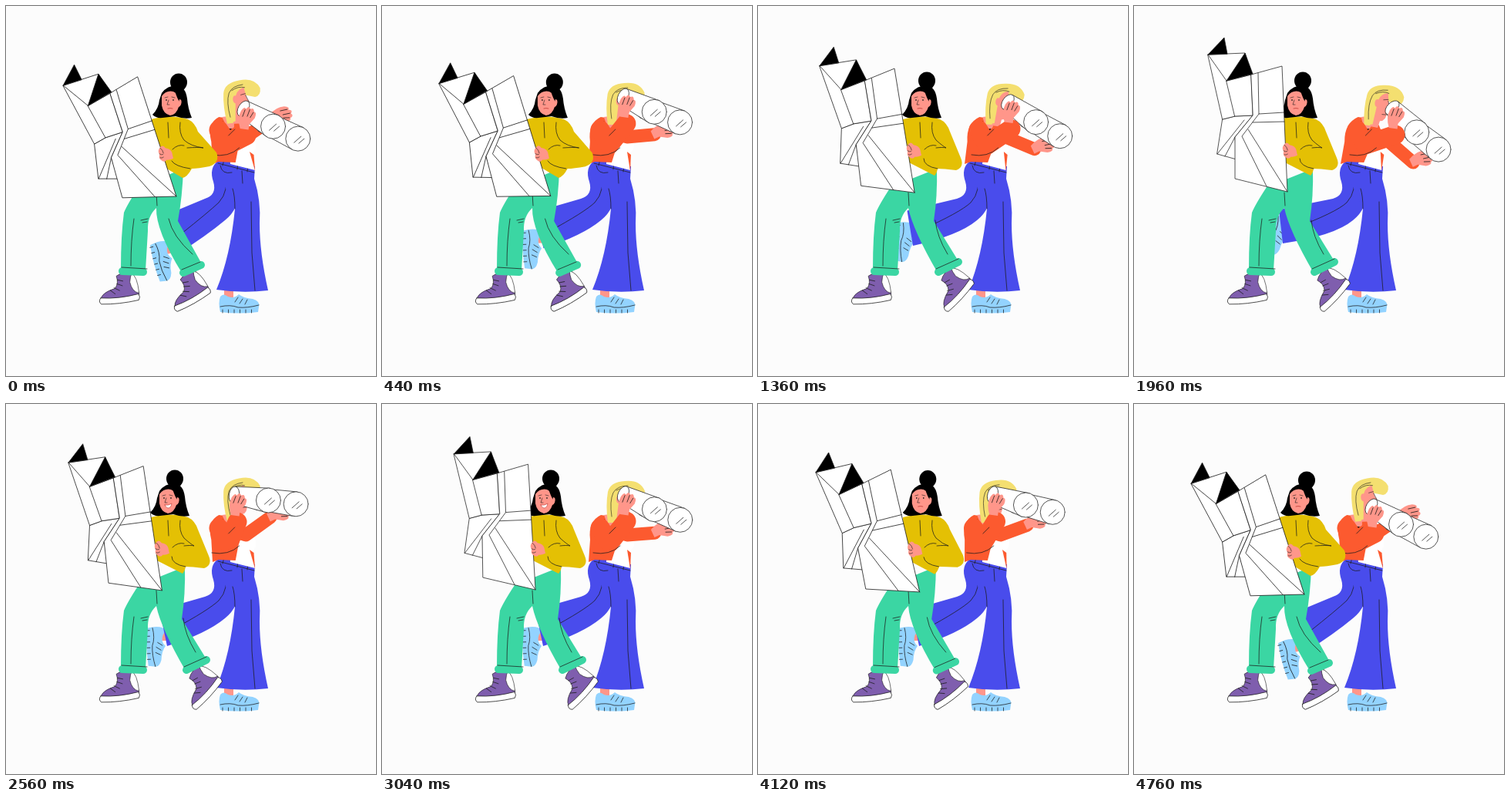
An HTML page with a canvas for the animation above (4800 ms loop, 480x480 px).

```html
<!DOCTYPE html>
<html lang="en">
<head>
<meta charset="utf-8">
<title>Finding the way</title>
<style>
html, body { margin: 0; width: 100%; height: 100%; overflow: hidden; background: #fcfcfc; }
canvas { display: block; width: 480px; height: 480px; }
</style>
</head>
<body>
<canvas id="stage"></canvas>
<script>
const LOOP = 4800, STEP = 40;
const C = {
  paper: '#fcfcfc', white: '#fff', ink: '#1c1c1c', black: '#000', green: '#3bd6a3',
  yellow: '#e4c004', purple: '#7f5eae', blue: '#494cec', orange: '#fc5a2f',
  blond: '#f4df70', skin: '#ff968a', sky: '#93d3ff', mouth: '#b9352f'
};
const canvas = document.getElementById('stage');
const ctx = canvas.getContext('2d');
const dpr = window.devicePixelRatio || 1;
canvas.width = canvas.height = 480 * dpr;

const lerp = (a, b, t) => a + (b - a) * t;
const rad = degrees => degrees * Math.PI / 180;

function ramp(x, from, to) {
  const p = Math.min(1, Math.max(0, (x - from) / (to - from)));
  return p * p * (3 - 2 * p);
}
function bump(x, center, reach) {
  const p = Math.min(1, Math.abs(x - center) / reach);
  return Math.cos(p * Math.PI / 2) ** 2;
}

function draw(d, fill, stroke, width = 0.75) {
  const p = new Path2D(d);
  if (fill) { ctx.fillStyle = fill; ctx.fill(p); }
  if (stroke) { ctx.strokeStyle = stroke; ctx.lineWidth = width; ctx.stroke(p); }
}
const line = (d, width) => draw(d, null, C.ink, width);
const sheet = (d, fill = C.white) => draw(d, fill, C.ink);

function ellipse(x, y, rx, ry, fill, stroke, turn = 0) {
  ctx.beginPath();
  ctx.ellipse(x, y, rx, ry, turn, 0, Math.PI * 2);
  ctx.fillStyle = fill;
  ctx.fill();
  if (stroke) { ctx.strokeStyle = stroke; ctx.lineWidth = 0.75; ctx.stroke(); }
}
function placed(x, y, degrees, body, scale = 1) {
  ctx.save();
  ctx.translate(x, y);
  ctx.rotate(rad(degrees));
  ctx.scale(scale, scale);
  body();
  ctx.restore();
}

// The map is rigid and swings about its lower right corner.
function drawMap(tilt) {
  placed(199 + 22 * tilt * tilt, 241 + 6 * tilt * tilt, -15.5 * tilt, () => {
    ctx.translate(-199, -241);
    sheet('M115 147L131 143L154 142L131 170L133 199L108 192Z');
    line('M108 192L143 148M118 195L131 170');
    sheet('M96 63L144 61L152 89L131 143L115 147Z');
    line('M96 63L120 97');
    sheet('M120 97L152 89L154 142L131 143Z');
    sheet('M152 89L192 78L199 241L131 224L131 170L154 142Z');
    line('M161 87L162 140L195 138M154 151L195 150M162 140L140 169L172 234M148 160L199 241');
    sheet('M96 63L117 41L121 62Z', C.black);
    sheet('M120 97L144 61L154 88Z', C.black);
  });
}

function sneaker(x, y, degrees) {
  placed(x, y, degrees, () => {
    draw('M34-36h13v12h-13z', C.skin);
    draw('M2 1Q4-7 21-11Q27-17 24-27Q34-33 46-29L52-2L51 3Z', C.purple, C.ink, 0.6);
    draw('M44-29Q51-26 52-3Q43-5 41-18Q42-25 44-29Z', C.white, C.ink, 0.6);
    sheet('M2 0Q26 3 51-2Q54 2 51 6Q25 10 2 8Q-2 4 2 0Z');
    line('M15-9l6 5M20-12l7 4M24-17l7 3M25-22l7 2');
  });
}
function trainer(x, y, degrees) {
  placed(x, y, degrees, () => {
    draw('M6-7h12v14h-12z', C.skin);
    draw('M1 4Q5-1 11 4Q19 7 25 1Q31 6 43 7Q53 10 51 17L50 24Q25 27 1 24Q-2 12 1 4Z', C.sky);
    line('M1 17Q14 14 24 18Q36 19 51 15M24 5l-4 6M30 7l-4 6M36 8l-3 6');
    for (let tread = 4; tread < 46; tread += 7.5) line(`M${tread} 25v-4`);
  });
}

// Each pose: body lean, telescope angle, its near end, swing of the rear leg.
const low = { lean: -7, aim: 31, x: 308, y: 133, kick: 0 };
const level = { lean: 0, aim: 26, x: 313, y: 117, kick: 1 };
const down = { lean: 6, aim: 45, x: 335, y: 132, kick: 2 };
const high = { lean: -7, aim: 9, x: 296, y: 118, kick: 1 };
const gazeMoves = [[80, 480, level], [1160, 1560, down], [2040, 2440, high], [2640, 3040, level],
  [3040, 3440, high], [3840, 4400, level], [4400, 4720, low]];

function gazeAt(time) {
  const pose = { ...low };
  for (const [from, to, goal] of gazeMoves) {
    const p = ramp(time, from, to);
    for (const key in pose) pose[key] = lerp(pose[key], goal[key], p);
  }
  return pose;
}

function tube(x, y, length, turn, nearRadius) {
  const ex = x + Math.cos(turn) * length, ey = y + Math.sin(turn) * length;
  const s = Math.sin(turn), c = Math.cos(turn), r = nearRadius, end = 16;
  sheet(`M${x + s * r},${y - c * r}L${ex + s * end},${ey - c * end}
    L${ex - s * end},${ey + c * end}L${x - s * r},${y + c * r}Z`);
  ellipse(x, y, r * 0.6, r, C.white, C.ink, turn);
  ellipse(ex, ey, end, end, C.white, C.ink);
  line(`M${ex - 5},${ey + 5}l9-8M${ex + 1},${ey + 6}l7-6`);
  return [ex, ey];
}
function sleeve(d, width) {
  draw(d, null, C.orange, width);
}
function hand(x, y, degrees) {
  placed(x, y, degrees, () => {
    draw('M-6 17Q-12 4-8-6Q-4-13-2-9Q1-15 4-10Q8-13 9-7Q13-7 11 1L5 10L5 17Z', C.skin);
    line('M-3-8l-2 9M3-9l-2 9M8-6l-3 7');
  });
}

function drawLookout({ lean, aim, x, y, kick }) {
  const hemX = 210 - 11 * kick, hemY = 270 - 3 * kick;
  const heelX = 225 - 16 * kick, heelY = 320 - 6 * kick;
  trainer(210 - 3 * kick, 303 - 14 * kick, 75 + 13 * kick);
  draw(`M275 201Q263 210 269 228Q274 245 258 250L${hemX},${hemY}L${heelX},${heelY}
    Q260 298 284 278Q294 270 298 260L310 215Z`, C.blue);
  line(`M284 215Q290 240 276 255Q262 268 ${hemX + 18},${hemY + 25}`);

  trainer(277, 373, 0);
  draw('M276 197L323 208L322 224Q331 253 329 282Q329 320 340 369Q307 373 273 368Q291 325 297 263L272 208Z', C.blue);
  line('M275 204L322 216M283 199l-2 8M301 203l-1 9M314 206l-1 9M306 214L307 230');
  line('M278 207Q280 219 293 216M318 254L319 320L323 369M297 263Q297 246 294 237');

  // The upper body leans about the waist.
  ctx.save();
  ctx.transform(1, 0, -lean / 55, 1, lean * 205 / 55, 0);
  draw('M294 150L318 164Q331 174 326 186L320 193L322 213L291 205Z', C.white);
  draw('M276 202L268 205L270 176Q267 152 284 144L298 146Q311 149 315 160L304 184L298 203Z', C.orange);
  draw('M318 189L323 193L322 214Z', C.orange);
  draw('M288 144L304 142L302 157L296 166Z', C.skin);
  draw('M288 149Q292 161 300 159Q297 168 292 165Q286 160 288 149Z', C.black);
  ctx.restore();

  const headY = 118 + 0.07 * lean * Math.abs(lean);
  placed(313 + 1.5 * lean, headY, lean, () => {
    draw('M-20 36Q-23 13-20-4Q-17-17 2-18Q22-20 28-5Q28 5 20 6L2 0L-4 36Z', C.blond);
    draw('M-12 2Q-6-12 7-8L9 6L13 13L8 17Q8 28 0 29L-2 38L-12 37Z', C.skin);
    draw('M-14 35Q-16 4-9-6Q2-15 14-7Q0-11-5 2L-9 34Z', C.blond);
    ellipse(-6, 6, 3, 5, C.skin);
    line('M-15 28Q-18 8-13-3Q-8-12 6-12M-9-6Q0-11 8-8M2 1l6-1M8 2l3 8l-4 1M2 20l5 0', 0.6);
  });

  const turn = rad(aim), farTurn = turn * 0.85;
  const lensX = x + Math.cos(turn) * 45, lensY = y + Math.sin(turn) * 45;
  const farX = lensX + Math.cos(farTurn) * 36, farY = lensY + Math.sin(farTurn) * 36;
  const gripX = farX - 20, gripY = farY + lerp(-32, 11, Math.min(1, kick));
  const shoulderX = 283 + lean, elbowX = 295 + 0.9 * lean;

  sleeve(`M${305 + lean} 166L${318 + lean} 170L${gripX - 13},${gripY + 6}`, 17);
  hand(gripX, gripY, 65);
  tube(farX - Math.cos(farTurn) * 50, farY - Math.sin(farTurn) * 50, 50, farTurn, 14);
  tube(x, y, 45, turn, 11);
  sleeve(`M${shoulderX} 161L${elbowX} 180L${x + 4},${y + 35}`, 25);
  line(`M${shoulderX - 9} 193Q${elbowX} 197 ${elbowX + 14} 184M${elbowX} 168L${elbowX + 8} 160`);
  hand(x + 4, y + 10, 8);
}

function drawLegs(step) {
  const v = (a, b) => lerp(a, b, step);
  sneaker(121, 379, -4);
  sneaker(v(217, 240), v(390, 392), v(-27, -45));
  draw(`M172 235L${v(230, 232)},211Q${v(229, 233)},246 ${v(223, 228)},279
    L${v(252, 260)},331L${v(228, 233)},346Q${v(194, 201)},291 195 262Q183 273 184 292L181 343L149 341
    Q149 298 153 268Q157 258 172 235Z`, C.green);
  draw('M151 344L178 345', null, C.green, 10);
  draw(`M${v(230, 234)},${v(346, 345)}L${v(253, 260)},${v(336, 332)}`, null, C.green, 10);
  line('M150 339L183 341M166 276Q162 304 162 337M175 278l9-2M177 281l6-1M195 242L196 259');
  line(`M${v(228, 231)},${v(342, 341)}L${v(252, 260)},${v(332, 328)}
    M${v(211, 230)},${v(276, 278)}Q${v(216, 232)},299 ${v(242, 246)},322`);
}

function drawNavigator(pull, smiling) {
  const v = (a, b) => lerp(a, b, pull);
  draw(`M188 147Q214 140 236 147Q245 151 249 163L${v(273, 263)},${v(190, 197)}
    Q${v(278, 268)},${v(203, 209)} ${v(264, 257)},${v(208, 213)}Q${v(249, 241)},211 ${v(241, 233)},211
    Q${v(235, 232)},${v(222, 217)} 229 ${v(223, 220)}L190 200Z`, C.yellow);
  line(`M210 151L211 171M226 151Q224 165 231 174Q240 182 ${v(256, 244)},184
    Q${v(249, 240)},183 ${v(235, 231)},184`);
  line(`M215 ${v(201, 198)}Q${v(219, 215)},208 ${v(239, 233)},211M216 186Q223 179 231 181`);

  placed(v(213, 210), 125, 0, () => {
    ellipse(v(11, 9), v(-26, -28), 11, 11.5, C.black);
    draw('M-11-12Q-4-22 9-22Q20-20 22-5Q23 8 28 20Q18 22 7 18L-10 20Q-18 21-23 16Q-15 8-14-3Z', C.black);
    draw('M-11-8Q-5-16 4-14Q12-11 12-1Q16 1 11 6Q8 16 0 17Q-9 15-11 4Z', C.skin);
    draw('M6-15Q9-5 12-1Q14 8 8 17L22 20L20-4Q16-16 6-15Z', C.black);
    draw('M12-4Q16-4 14 3Q12 7 10 5Z', C.skin);
    line('M-7-6l4-1M2-7l4 1M-2-3l-2 6l3 0', 0.6);
    ellipse(-5, -3, 0.8, 1, C.ink);
    ellipse(4, -3, 0.8, 1, C.ink);
    if (smiling) draw('M-4 6Q1 7 5 4Q4 10 0 10Q-3 9-4 6Z', C.white, C.mouth, 0.6);
    else draw('M-3 8Q0 7 3 8', null, C.mouth);
  });
}

function drawGrip(pull) {
  placed(lerp(206, 201, pull), lerp(191, 187, pull), 0, () => {
    draw('M-7-9Q-3-14 1-8Q9-7 11-1L13 8Q6 11 3 10Q0 15-5 11Q-10 8-8 2Q-12-3-7-9Z', C.skin);
    line('M-7-8Q-3-5-2 0M-8 1Q-5 3-3 2M-7 7Q-4 8-2 6');
  }, 0.85);
}

function render(time) {
  ctx.setTransform(dpr, 0, 0, dpr, 0, 0);
  ctx.fillStyle = C.paper;
  ctx.fillRect(0, 0, 480, 480);
  ctx.lineJoin = ctx.lineCap = 'round';

  const lifted = ramp(time, 380, 820) - ramp(time, 3560, 4440);
  const tilt = 1 - lifted + 0.6 * (bump(time, 1500, 400) + bump(time, 2720, 400));
  const step = ramp(time, 400, 800) - ramp(time, 3920, 4290);
  const pull = 1 - ramp(tilt, 0.55, 1);
  const smiling = (time > 700 && time < 1300) || (time > 2350 && time < 3700);

  drawLookout(gazeAt(time));
  drawLegs(step);
  drawNavigator(pull, smiling);
  drawMap(tilt);
  drawGrip(pull);
}

const start = performance.now();
function tick() {
  const time = (performance.now() - start) % LOOP;
  render(Math.floor(time / STEP) * STEP);
  requestAnimationFrame(tick);
}
tick();
</script>
</body>
</html>
```
